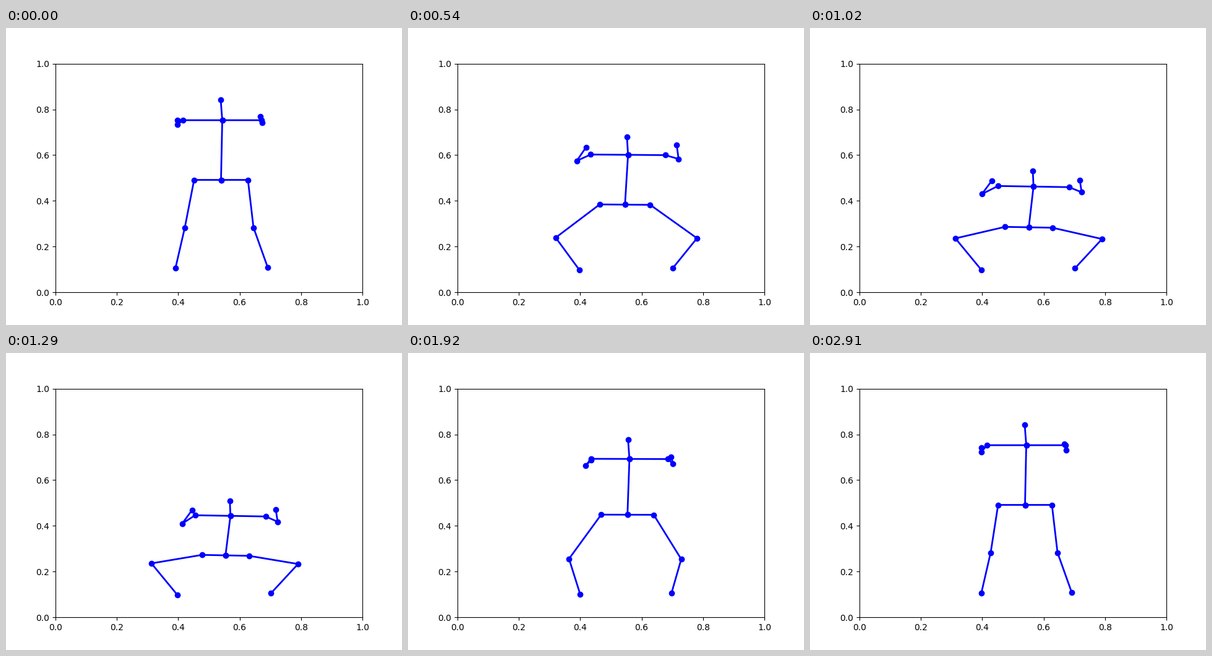
Recreate the animation shown at these times as a matplotlib script. Size 640 by 480 pixels, loop 2.94 s.

```python
import numpy as np
import matplotlib.pyplot as plt
from matplotlib.animation import FuncAnimation

FRAMES, INTERVAL = 98, 30
BOTTOM, TOP = 42, 73  # times of the deepest squat and of standing again

# Standing and squatting position of each joint, in stage pixels
TORSO = {
    "head": [(347, 116), (361, 239)],
    "sho_l": [(286, 149), (305, 262.5)],
    "sho_r": [(413, 149), (419, 264.5)],
    "hip_l": [(304, 245.5), (316, 326.5)],
    "hip_r": [(391, 245.5), (392, 328)],
}
ARMS = {
    "elb_l": [(277, 156), (284, 276)],
    "elb_r": [(414, 153), (439, 273)],
    "wri_l": [(277, 149), (300, 254)],
    "wri_r": [(411, 143), (436, 253)],
}
LEGS = {
    "kne_l": [(289, 322.5), (235, 340)],
    "kne_r": [(400, 322.5), (472, 341)],
    "ank_l": [(274, 387.5), (277, 391)],
    "ank_r": [(423, 387), (428, 388.5)],
}
CHAINS = [
    "head neck pelvis",
    "wri_l elb_l sho_l neck sho_r elb_r wri_r",
    "ank_l kne_l hip_l pelvis hip_r kne_r ank_r",
]


def ease(u):
    return (1 - np.cos(np.pi * u)) / 2


def mix(pose, fx, fy):
    stand, squat = np.array(pose, float)
    return stand + (squat - stand) * (fx, fy)


def skeleton(t):
    down = min(t / BOTTOM, 1)
    up = np.clip((t - BOTTOM) / (TOP - BOTTOM), 0, 1)
    rise = ease(up)
    depth = ease(down ** 0.835) - rise
    spread = 1 - (1 - depth) ** 4  # knees and elbows open early
    flare = np.sin(np.pi * down)
    sway = 7.5 * np.sin(np.pi * up)

    j = {k: mix(p, depth, depth) + (sway, 0) for k, p in TORSO.items()}
    j["neck"] = (j["sho_l"] + j["sho_r"]) / 2
    j["pelvis"] = (j["hip_l"] + j["hip_r"]) / 2

    for k, p in ARMS.items():
        j[k] = mix(p, spread, depth) + (0, 4 * rise)
        if k.endswith("_l"):
            j[k][0] += sway - 11 * flare
        if k.startswith("wri"):
            j[k][1] -= 15 * flare * (1 - depth)

    for k, p in LEGS.items():
        j[k] = mix(p, spread, spread)
        if k.endswith("_l"):
            j[k][0] += 3 * rise
    return j


fig, ax = plt.subplots(figsize=(6.4, 4.8), dpi=100)
ax.set(xlim=(0, 1), ylim=(0, 1))
limbs = [ax.plot([], [], "bo-", lw=2)[0] for _ in CHAINS]


def update(n):
    joints = skeleton(n)
    for line, chain in zip(limbs, CHAINS):
        x, y = np.array([joints[k] for k in chain.split()]).T
        line.set_data((x - 80) / 496, (427.2 - y) / 369.6)
    return limbs


anim = FuncAnimation(fig, update, frames=FRAMES, interval=INTERVAL,
                     repeat=True, repeat_delay=0)
plt.show()
```
